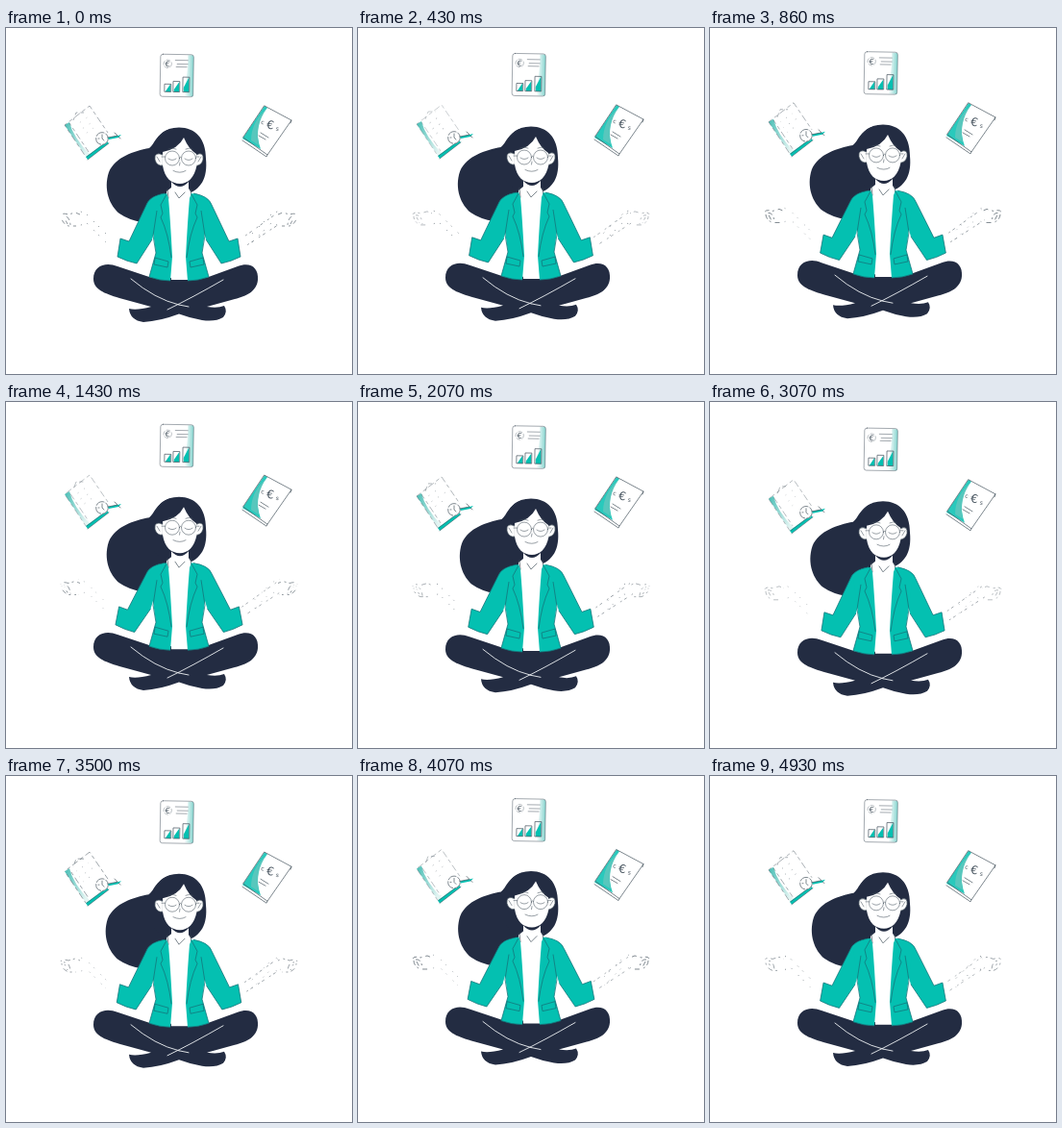
Animation of 360x360 px, one loop 5000 ms. Source, as an HTML page:

```html
<!DOCTYPE html>
<html lang="en">
<head>
<meta charset="utf-8">
<title>Balance</title>
<style>
  html, body { margin: 0; width: 100%; height: 100%; overflow: hidden; background: #fff; }
  svg { display: block; width: 100vw; height: 100vh; }
  .navy { fill: #232c42; }
  .teal { fill: #04c0b1; }
  .line { fill: none; stroke: #46535e; stroke-width: .7; stroke-linecap: round; stroke-linejoin: round; }
  .fold { fill: none; stroke: #15777b; stroke-width: .8; stroke-linejoin: round; }
  .seam { fill: none; stroke: #eef1f3; stroke-width: .9; stroke-linecap: round; }
  .broken { stroke-linecap: butt; }
  text { font-family: "DejaVu Sans", sans-serif; fill: #46535e; text-anchor: middle; }
</style>
</head>
<body>
<svg viewBox="0 0 360 360">
  <defs>
    <linearGradient id="shade">
      <stop offset=".3" stop-color="#fff"/>
      <stop offset="1" stop-color="#86d5cf"/>
    </linearGradient>
    <linearGradient id="fade" x2="1" y2=".3">
      <stop offset="0" stop-color="#45bdb4"/>
      <stop offset="1" stop-color="#e2f4f2"/>
    </linearGradient>
    <g id="coat">
      <path class="teal" d="M167 172L154 176Q149 180 150 190L156 234L149 259Q160 263 171 263L173 238Q171 200 169 177Z"/>
      <path class="fold" d="M167 173L161 184L163 193L161 197Q169 214 172 239M157 190L153 216L156 234L149 259Q160 263 171 263M155 239L169 243L168 249L154 246Z"/>
    </g>
    <g id="sleeve">
      <path class="teal" d="M165 172Q149 175 146 184L128 222L119 219L116 238Q126 243 136 245L152 220L160 190Z"/>
      <path class="fold" d="M165 172Q149 175 146 184L128 222L119 219L116 238Q126 243 136 245L152 220"/>
    </g>
    <g id="arm">
      <path class="line broken" d="M57 195Q58 192 65 194L72 192L77 194M58 197Q58 203 65 206L73 206M60 196Q66 195 67 205M61 198L64 204" stroke-dasharray="5 3 2 4"/>
      <path class="line broken" d="M75 190L83 193L105 215M75 206L84 203L104 223" stroke-dasharray="1 6 1 9"/>
    </g>
  </defs>

  <g id="chart">
    <g transform="rotate(1 178 49)">
      <rect x="160.500" y="27.500" width="34.500" height="44" rx="2.500" fill="#fff"/>
      <path d="M189 28H193Q195 28 195 30V71H182Q190 54 189 28" fill="url(#shade)"/>
      <rect class="line" x="160.500" y="27.500" width="34.500" height="44" rx="2.500" stroke-opacity=".7"/>
      <circle class="line" cx="168" cy="37.500" r="4.200" stroke-dasharray="4 2" stroke-opacity=".5"/>
      <text x="168" y="40.500" font-size="8">€</text>
      <path class="line" d="M176 33.500H189M178 37.500H189M177 40.500H188" stroke-opacity=".7"/>
      <path class="teal" d="M166 66.500L171.500 58V66.500ZM175 66.500V64L180.500 56V66.500ZM185 66.500V62L190.500 51V66.500Z"/>
      <path class="line" d="M165.500 58.500H172V66.500H165.500ZM174.500 55.500H181V66.500H174.500ZM184.500 51H191V66.500H184.500Z"/>
    </g>
  </g>

  <g id="book">
    <path fill="#fff" d="M269 81L297 96L271 134L246 117Z"/>
    <path class="teal" d="M269 81L272 83Q256 101 265 126L246 115Z" fill-opacity=".85"/>
    <path d="M271 84Q259 101 263 122L255 117Q255 98 271 84" fill="#58c7bd"/>
    <path class="line" d="M269 81L297 96L272 132L247 114ZM246 117L271 134L272 132M297 96L296 99"/>
    <g transform="rotate(10 275 101)">
      <text x="275" y="105" font-size="12">€</text>
      <text x="266.500" y="101.500" font-size="6">c</text>
      <text x="283" y="105.500" font-size="6">s</text>
    </g>
    <path class="line" d="M265 109L273 114M263 112L270 116"/>
  </g>

  <g id="clip">
    <path fill="#fff" d="M61 101L87 81L108 117L84 136Z"/>
    <path d="M61 101L66 98Q70 114 87 131L84 135Z" fill="url(#fade)"/>
    <path class="teal" d="M83 134L105 118L107 120L85 137Z"/>
    <g class="line" stroke-opacity=".75">
      <path d="M84 134L105 118M85 137L107 120"/>
      <path class="broken" d="M61 101L87 81L106 109M61 101L83 134M66 99L86 129M70 96L73 88L81 88" stroke-dasharray="4 3 7 3"/>
      <path class="broken" d="M73 101L86 92M76 107L91 97M80 112L91 104" stroke-dasharray="1 7"/>
    </g>
    <circle cx="100" cy="115" r="6.500" fill="#fff"/>
    <circle class="line" cx="100" cy="115" r="6.300" stroke-dasharray="9 2"/>
    <path class="line" d="M100 111V115L102 117M96 115H97"/>
    <path class="teal" d="M106 114L116 112L120 111L117 114L107 116Z"/>
    <path class="line" d="M106 114L116 112L113 109M117 113L119 115"/>
  </g>

  <g id="arms">
    <use href="#arm"/>
    <use href="#arm" transform="matrix(-1 0 0 1 360 0)"/>
    <path class="line broken" d="M283 192L245 219M286 203L249 227" stroke-dasharray="3 3 2 6"/>
  </g>

  <g id="legs">
    <path class="navy" d="M91 261C91 247 104 243 116 248L152 260H208L241 248C254 243 263 249 262 262C261 274 250 279 238 282L209 290Q220 292 227 289Q231 295 226 301Q218 306 204 304Q192 302 180 297.500Q160 305 143 306Q129 304 128 292Q136 294 151 290L118 281C102 276 91 272 91 261Z"/>
    <path class="seam" d="M130 261Q155 282 180 288M226 262Q193 281 168 293M180 288L190 290"/>
  </g>

  <g id="body">
    <path id="hair" class="navy" d="M168 106C156 111 155 120 149 125C133 128 114 134 107 150C101 168 108 185 118 193Q128 200 142 202L160 192L172 173L190 130Z"/>
    <path class="navy" d="M180 103.500C197 103.500 208 115 208 136C210 156 203 168 188 173H166L154 160V126Q157 104 180 103.500Z"/>
    <path fill="#fff" d="M167 170L172 166V158H190V167L194 173L190 262H172Z"/>
    <path class="navy" d="M172 155H190V160Q181 170 172 160Z"/>
    <path class="line" d="M163 132Q154 128 155 137Q157 144 163 143ZM198 132Q206 128 205 137Q203 144 197 143Z" style="fill:#fff"/>
    <path fill="#fff" d="M163 129Q179 126 185 114Q190 126 198 131L198.500 143C196 156 189 162 181 162C172 162 165 156 163 143Z"/>
    <path class="line" d="M176 171L180 177L186 171M168 168L169 177M192 168L193 176"/>
    <g class="line" stroke-opacity=".8">
      <path d="M157 134L160 139M203 134L200 139M169 136Q173 139 177 136M186 136Q190 139 194 136M169 126Q173 124 177 126M187 126Q191 124 194 126M181 140L180.500 143"/>
      <circle cx="173" cy="135.500" r="7.500"/><circle cx="190" cy="135.500" r="7.500"/>
      <path d="M180.500 135Q181.500 133 182.500 135M162 134H165.500M197.500 134H201M174 148.500Q181 152 187 148.500"/>
    </g>
    <use id="left" href="#sleeve"/>
    <g transform="matrix(-1 0 0 1 360 0)"><use id="right" href="#sleeve"/></g>
    <use href="#coat"/>
    <use href="#coat" transform="matrix(-1 0 0 1 360 0)"/>
  </g>
</svg>
<script>
  const $ = id => document.getElementById(id);
  const LOOP = 5000, STEPS = 70, BREATH = 2900;
  const lift = { chart: 4, book: 4.8, clip: 5, arms: 5.5, legs: 6, body: 4.8 };
  const broken = document.querySelectorAll('.broken');
  const noise = n => { const v = Math.sin(n * 91.7) * 4375.5; return v - Math.floor(v); };

  function draw(now) {
    const step = Math.floor((now % LOOP + 4) / (LOOP / STEPS)) % STEPS;
    const phase = step * LOOP / STEPS / BREATH * Math.PI * 2;
    const up = (1 - Math.cos(phase)) / 2;
    for (const id in lift) $(id).setAttribute('transform', `translate(0 ${-lift[id] * up})`);

    // The loose hair trails the breath by a quarter turn
    const sway = 1 + Math.sin(phase) * .015;
    $('hair').setAttribute('transform', `translate(180 0) scale(${sway} 1) translate(-180 0)`);
    for (const id of ['left', 'right']) $(id).setAttribute('transform', `rotate(${2 * up} 155 178)`);

    // Thin outlines break up differently on each step
    broken.forEach((el, i) => {
      const n = noise(step + i * 17 + 1);
      el.setAttribute('stroke-dashoffset', n * 14);
      el.setAttribute('opacity', .5 + n / 2);
    });
  }

  function tick() {
    draw(performance.now());
    requestAnimationFrame(tick);
  }
  tick();
</script>
</body>
</html>
```
